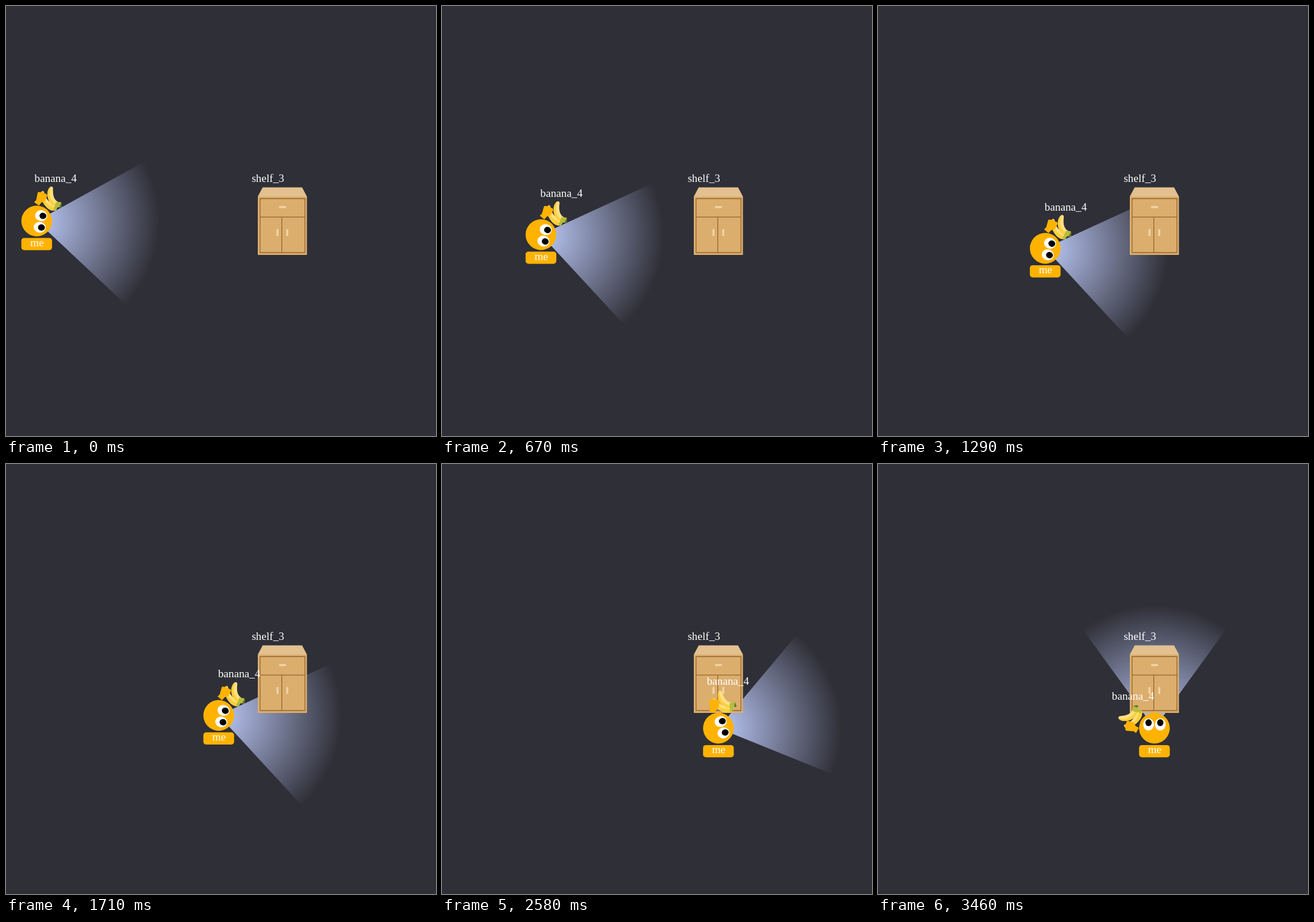
Recreate the animation shown at these times as an HTML page with a canvas. Size 748 by 748 pixels, loop 3750 ms.

```html
<!DOCTYPE html>
<html lang="en">
<head>
<meta charset="utf-8">
<title>Carrying a banana to the shelf</title>
<style>
  html, body { margin: 0; width: 100%; height: 100%; overflow: hidden; background: #2f2f37; }
  canvas { display: block; }
</style>
</head>
<body>
<canvas id="stage" width="748" height="748"></canvas>
<script>
const ctx = document.getElementById('stage').getContext('2d');
const SIZE = 748, CELL = SIZE / 14, LOOP = 3750, RAD = Math.PI / 180;
const START = { x: CELL, y: 7 * CELL }, GOAL = { x: 9 * CELL, y: 8.6 * CELL };
const TRAVEL = Math.atan2(GOAL.y - START.y, GOAL.x - START.x) / RAD;
const ORANGE = '#ffb300';

// Drawn for an agent that looks up, with its centre at 0,0
const HAND = 'M-27 -.5L-32 8.5L-36 5.5L-49 4.5Q-51 4-50.5 0L-52.5 -3.5L-49 -7Q-50 -13-45 -12.5L-36 -10L-33 -4Z';
const BANANA = [
  ['M-23 -31C-19 -24-23 -15-33 -7Q-43 0-52 -2Q-55 -5-50 -7C-41 -10-33 -18-32 -30Z', '#ffe082'],
  ['M-23 -31C-19 -24-23 -15-33 -7Q-43 0-52 -2C-40 -4-29 -14-27 -29Z', '#fdd03a'],
  ['M-37 -35C-39 -26-46 -22-60 -21Q-64 -20-62 -16Q-57 -11-46 -13C-35 -16-28 -24-29 -33Z', '#ffe082'],
  ['M-62 -17Q-50 -14-41 -20Q-33 -26-32 -33L-29 -32C-28 -24-35 -16-46 -13Q-57 -11-62 -17Z', '#fdd03a'],
  ['M-38 -38L-29 -39L-28 -33L-22 -31L-23 -26L-30 -28L-37 -29Z', '#b5bd3c'],
  ['M-37 -39L-29 -40L-28 -37L-31 -36Z', '#66752f']
];

function fill(d, color) {
  ctx.fillStyle = color;
  ctx.fill(new Path2D(d));
}

function ellipse(x, y, rx, ry, color) {
  ctx.fillStyle = color;
  ctx.beginPath();
  ctx.ellipse(x, y, rx, ry, 0, 0, 2 * Math.PI);
  ctx.fill();
}

function box(x, y, w, h, r, color) {
  ctx.fillStyle = color;
  ctx.beginPath();
  ctx.roundRect(x, y, w, h, r);
  ctx.fill();
}

function label(text, x, y) {
  ctx.font = '19.2px "Liberation Serif", "Times New Roman", serif';
  ctx.fillStyle = '#fff';
  ctx.fillText(text, x, y);
}

function drawView(x, y, heading) {
  const radius = 4 * CELL, light = ctx.createRadialGradient(x, y, 0, x, y, radius);
  light.addColorStop(0, 'rgba(188,201,248,1)');
  light.addColorStop(1, 'rgba(188,201,248,0)');
  ctx.fillStyle = light;
  ctx.beginPath();
  ctx.moveTo(x, y);
  ctx.arc(x, y, radius, (heading - 36) * RAD, (heading + 36) * RAD);
  ctx.fill();
}

function drawShelf() {
  box(438, 331, 85.5, 102, 0, '#dbae6e');
  fill('M446.5 315.5H515L523.5 331.5H438Z', '#e2c090');
  ctx.strokeStyle = '#946329';
  ctx.lineWidth = 1.3;
  ctx.stroke(new Path2D('M442 335H520V429H442ZM442 367.2H520M479.7 367.2V429'));
  box(475, 348, 12, 3.6, 1, '#f0d3a4');
  box(470.5, 388, 3.5, 12, 1, '#f0d3a4');
  box(487.5, 388, 3.5, 12, 1, '#f0d3a4');
  label('shelf_3', 427.4, 306);
}

function drawAgent(x, y, heading) {
  ctx.save();
  ctx.translate(x, y);
  ctx.save();
  ctx.rotate((heading + 90) * RAD);
  ellipse(0, 0, CELL / 2, CELL / 2, ORANGE);
  for (const side of [-10.2, 10.2]) {
    ellipse(side, -6.5, 9.4, 10.5, '#fff');
    ellipse(side, -9.6, 5.5, 6, '#000');
  }
  for (const [d, color] of BANANA) fill(d, color);
  fill(HAND, ORANGE);
  ctx.restore();
  box(-CELL / 2, 29.4, CELL, 21.4, 5, ORANGE);
  label('me', -11.2, 44);

  // The name follows the banana but stays level
  const c = Math.cos(heading * RAD), s = Math.sin(heading * RAD);
  label('banana_4', 21.9 * c + 43 * s - 31, 21.9 * s - 43 * c - 28);
  ctx.restore();
}

// 24 steps a second: turn, walk to the shelf, then turn up to face it
function draw() {
  const time = performance.now() % LOOP;
  const step = Math.floor((Math.floor(time / 10) + 0.49) * 0.24);
  const clamp = v => Math.min(1, Math.max(0, v));
  const walk = clamp((step - 1) / 54), turn = clamp((step - 55) / 28);
  const x = START.x + (GOAL.x - START.x) * walk;
  const y = START.y + (GOAL.y - START.y) * walk;
  const heading = step < 1 ? 7.2 : TRAVEL + (-90 - TRAVEL) * turn;

  ctx.fillStyle = '#2f2f37';
  ctx.fillRect(0, 0, SIZE, SIZE);
  drawView(x, y, heading);
  drawShelf();
  drawAgent(x, y, heading);
  requestAnimationFrame(draw);
}
draw();
</script>
</body>
</html>
```
